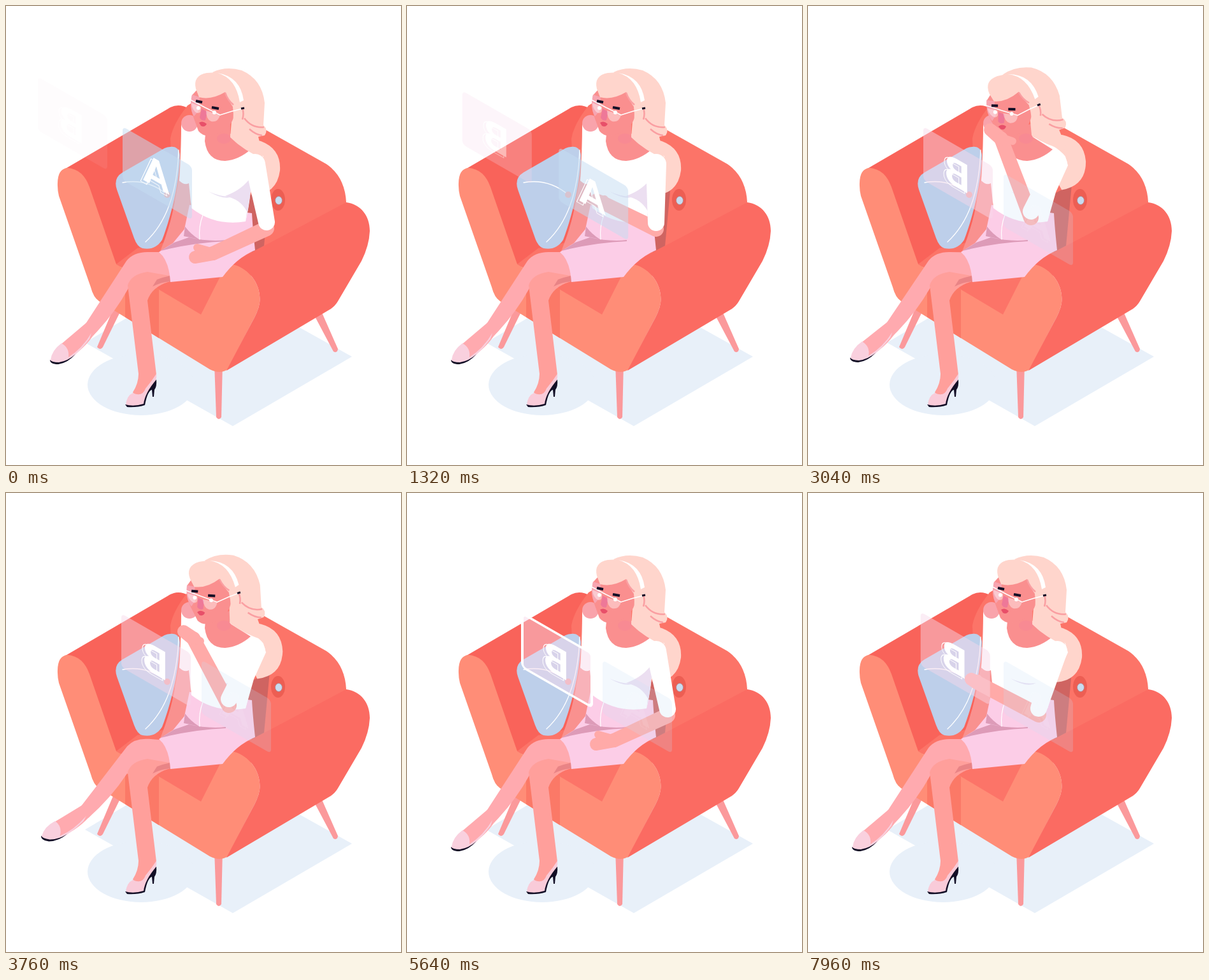
An HTML page for the animation above (8000 ms loop, 620 px wide and 720 px high).

```html
<!DOCTYPE html>
<html lang="en">
<head>
<meta charset="utf-8">
<title>Choosing a card</title>
<style>
  html, body { margin: 0; width: 100%; height: 100%; overflow: hidden; background: #fff; }
  svg { display: block; width: 620px; height: 720px; }
  text { font: 700 62px Roboto, "Open Sans", sans-serif; text-anchor: middle; }
  .hair { fill: #ffd5cc; }
  .face { fill: #fa8f8f; }
  .skin { fill: #ffaaa8; }
  .front { fill: #ff8d77; }
  .line { fill: none; stroke: #fff; stroke-linecap: round; }
</style>
</head>
<body>
<svg viewBox="0 0 620 720">
  <!-- floor -->
  <g fill="#e8f0f9">
    <path d="M124 528 290 430 462 505 543 550 356 659Z"/>
    <ellipse cx="212" cy="594" rx="84" ry="48"/>
  </g>

  <!-- sofa -->
  <g fill="#fb999b">
    <path d="M172 466 184 470 152 535Q148 541 143 535Z"/>
    <path d="M327 560H340L338 645Q334 651 330 645Z"/>
    <path d="M480 478 491 470 521 538Q520 545 514 542Z"/>
  </g>
  <path fill="#f9635a" d="M90 257 258 159Q272 152 287 161L300 390 175 410 120 300Z"/>
  <path fill="#fc7468" d="M258 208Q262 185 285 156L300 147 400 190 503 248Q532 268 534 308L470 400 320 440 262 300Z"/>
  <path fill="#fc7468" d="M173 405 206 380 400 340 360 470 306 486Z"/>
  <path class="front" d="M81 282Q80 255 97 254 121 256 131 284L173 405 306 484 342 413Q348 403 362 407C388 417 401 443 398 466Q396 479 385 498L348 570Q336 578 320 570L146 463Q137 457 133 441L83 298Q81 290 81 282Z"/>
  <path fill="#fb7967" d="M187 413 240 445V521L187 488Z"/>
  <path fill="#fb6b62" d="M345 408 534 308C557 311 571 329 571 353Q570 376 558 400L521 463Q517 470 510 475L346 572 385 498Q396 479 398 466C401 443 388 417 362 407Q352 403 345 408Z"/>
  <ellipse cx="427" cy="304" rx="11" ry="17" fill="#ed5e53"/>
  <ellipse cx="428" cy="305" rx="5.5" ry="6.5" fill="#c9dcf0" stroke="#b9868c"/>

  <!-- cushion -->
  <path fill="#bdcfea" d="M183 261 249 223Q271 215 273 234C272 275 260 328 245 367Q234 384 214 380 206 378 201 364L174 288Q168 270 183 261Z"/>
  <path class="line" stroke-width="1.3" d="M183 277Q222 270 253 296M271 226Q268 325 219 370"/>
  <circle cx="253" cy="296" r="5" fill="#eda7ab"/>

  <path fill="#cf6461" d="M376 300 414 280 405 376 386 386Z"/>
  <path id="lobe" class="hair" d="M350 200 400 212Q432 224 430 258 425 296 386 297Z"/>

  <!-- legs -->
  <g id="leg">
    <path fill="#ffaaaf" d="M262 386H222Q200 386 189 400L122 503 137 517Q170 483 192 443 215 445 262 428Z"/>
    <g id="foot">
      <path fill="#ffaaaf" d="M126 497 87 530 97 553Q122 540 141 511Z"/>
      <path fill="#f9d0de" d="M70 555Q72 540 87 529 100 536 98 551 120 537 134 513L131 522Q113 546 98 555 84 562 70 557Z"/>
      <path fill="#130f26" d="M69 555Q69 562 82 562 97 560 109 546 97 557 83 559 72 559 69 555Z"/>
    </g>
  </g>
  <path fill="#ff9f9b" d="M262 424 222 417Q196 421 191 438L208 577Q208 592 199 606L210 620 228 600 236 578 222 462Q230 438 262 431Z"/>
  <path fill="#e98486" d="M237 429Q247 425 258 423V432Q244 433 230 440Z"/>
  <path fill="#f9cbd9" d="M188 625Q190 611 199 607 214 614 219 600 229 588 236 577 238 590 224 602 218 616 216 624 200 631 188 625Z"/>
  <path fill="#130f26" d="M187 625Q200 629 216 624 218 607 236 586 237 597 233 602L232 613H230L229 602Q222 604 218 626 206 630 190 629Z"/>

  <!-- body -->
  <path fill="#f9918f" d="M272 268 290 276Q293 310 282 350L270 382 242 385Q260 340 266 300Z"/>
  <path fill="#fccde7" d="M288 312 386 325Q387 345 391 383 362 395 340 425L258 433Q256 399 240 386L262 372 280 350Z"/>
  <path fill="#dd9bb8" d="M243 384 264 371 287 363Q318 370 345 367V369Q295 371 243 384ZM281 346 279 361 303 366Q290 358 281 346Z"/>
  <path class="line" stroke-width="1.2" d="M309 328Q302 346 304 366"/>
  <path fill="#fff" d="M275 186Q290 175 314 196L352 205Q390 218 404 236L386 268Q383 310 376 338 328 346 291 317L287 278Q280 282 272 274 275 225 275 186Z"/>
  <path id="side" fill="#fff" d="M404 236 408 250 389 292 376 338 380 265Z"/>
  <path fill="#e9e0f2" d="M318 291Q340 301 358 298 344 306 318 291Z"/>
  <path id="fold" fill="#ecdff1" d="M386 266Q372 288 344 298 368 303 378 322L376 338Q384 300 386 266Z"/>
  <path class="face" d="M314 190 312 212Q316 243 344 243 366 241 384 225L352 205V185Z"/>
  <ellipse cx="342" cy="208" rx="11" ry="8" fill="#f88a93"/>
  <circle cx="288" cy="184" r="13" fill="#f9a3ab"/>

  <!-- head -->
  <g id="head">
    <path class="hair" d="M324 104Q345 94 370 101 402 115 406 152L404 187Q412 194 406 203L396 205 404 240Q372 226 352 206L358 130Z"/>
    <path class="face" d="M292 140Q288 158 294 174L302 196Q309 205 322 203 348 199 357 176L362 130 310 120Z"/>
    <path fill="#f7a5b1" d="M292 139Q287 160 295 173L302 165 304 143Z"/>
    <path class="hair" d="M298 130Q293 109 315 105 347 101 360 126L374 158 364 206 352 206Q359 180 356 158 348 147 344 135 322 148 303 143Z"/>
    <path fill="none" stroke="#fa9fa2" stroke-width="2.5" d="M344 136Q348 148 357 155M371 178Q374 169 371 160M374 176Q386 192 405 190M382 193Q392 202 402 203"/>
    <path fill="#fff" d="M332 105Q361 113 367 151L373 148Q368 111 332 105Z"/>
    <path fill="#ee7898" d="M307 161 316 166 313 179Q307 181 304 175Z"/>
    <path fill="#e84f69" d="M303 183Q309 179 315 185 312 191 306 188Z"/>
    <g fill="#fff" fill-opacity=".4">
      <path d="M291 152 306 158Q307 169 300 168 292 164 291 152Z"/>
      <path d="M314 164 336 171Q333 183 322 181 314 178 314 164Z"/>
    </g>
    <path class="line" stroke-width="1.5" d="M289 147 295 150 312 159 336 171 355 165 371 161"/>
    <circle cx="302" cy="160" r="3" fill="#fff"/>
    <circle cx="327" cy="167" r="3" fill="#fff"/>
    <path stroke="#130f26" stroke-width="4" d="M298 149 308 151M323 159 334 161"/>
    <path stroke="#130f26" stroke-width="3" d="M369 161 374 160"/>
  </g>

  <!-- moving arm -->
  <path id="forearm" class="skin"/>
  <path id="hand" class="skin"/>
  <path id="thumb" class="skin"/>
  <path id="sleeve" fill="#fff"/>

  <!-- cards -->
  <g id="cardA">
    <rect class="pane" width="109" height="84" rx="6" fill="#c5dcf2" fill-opacity=".52"/>
    <g class="letter">
      <text x="53" y="65" fill="#fff">A</text>
      <text x="49" y="69" class="line">A</text>
    </g>
  </g>
  <g id="cardB">
    <rect class="pane" width="109" height="84" rx="6" fill="#f6d7ea" fill-opacity=".46"/>
    <rect id="flash" width="109" height="84" rx="6" fill="#fff" fill-opacity=".3"/>
    <g class="letter" transform="matrix(-1 0 0 1 106 0)">
      <text x="53" y="65" fill="#fff">B</text>
      <text x="57" y="68" class="line">B</text>
    </g>
    <rect id="border" class="line" width="109" height="84" rx="6" stroke-width="4"/>
  </g>
</svg>

<script>
const LOOP = 8000;
const $ = id => document.getElementById(id);
const clamp = u => Math.min(1, Math.max(0, u));
const smooth = u => u * u * (3 - 2 * u);
const cubic = u => u < .5 ? 4 * u ** 3 : 1 - 4 * (1 - u) ** 3;
const span = (t, from, to) => cubic(clamp((t - from) / (to - from)));

// Arm poses: elbow, palm, fingertip offset, thumb offset
const REST = [409, 339, 325, 388, -28, 6, -25, -9];
const TOUCH = [362, 338, 265, 297, -9, -5, 2, -6];
const DRAG = [391, 340, 308, 309, -11, -5, 2, -6];
const LIFT = [376, 338, 298, 280, -6, -6, 4, -5];
const CHIN = [350, 322, 303, 208, -17, -14, 18, 4];
const TAP = [350, 326, 268, 290, -10, -3, -11, 3];

const tracks = {
  arm: [[120, REST], [480, TOUCH], [840, TOUCH], [1320, DRAG], [1960, LIFT], [2560, CHIN], [3500, CHIN],
        [4300, TAP], [4700, TAP], [5600, REST], [7080, REST], [7640, TOUCH], [7960, TOUCH]],
  head: [[1800, [0]], [2560, [-10]], [3500, [-10]], [4180, [0]]],
  foot: [[1960, [0]], [2510, [7.3]], [3060, [.9]], [3650, [4.7]], [4360, [2]], [5200, [0]]],
  fold: [[1960, [1]], [2400, [0]], [4900, [0]], [5400, [1]], [7100, [1]], [7500, [0]]],
  paneA: [[1320, [1]], [2560, [.4]]],
  letterA: [[1320, [1]], [2500, [.1]]],
  cardB: [[840, [.18]], [1860, [1]]],
  flash: [[4100, [0]], [4340, [1]], [4800, [0]]],
  border: [[4700, [0]], [5200, [1]], [7080, [1]], [7500, [0]]],
};

function at(name, t) {
  const keys = tracks[name];
  const i = keys.findIndex(k => k[0] > t);
  if (i === 0) return keys[0][1];
  if (i < 0) return keys[keys.length - 1][1];
  const [t0, a] = keys[i - 1], [t1, b] = keys[i];
  const u = smooth((t - t0) / (t1 - t0));
  return a.map((v, j) => v + (b[j] - v) * u);
}

// Tapered capsule between two circles
function limb(id, x1, y1, r1, x2, y2, r2) {
  const len = Math.hypot(x2 - x1, y2 - y1) || 1;
  const nx = (y2 - y1) / len, ny = (x1 - x2) / len;
  const p = (x, y, r) => `${x + nx * r} ${y + ny * r}`;
  $(id).setAttribute("d", `M${p(x1, y1, r1)}L${p(x2, y2, r2)}A${r2} ${r2} 0 0 1 ${p(x2, y2, -r2)}` +
    `L${p(x1, y1, -r1)}A${r1} ${r1} 0 0 1 ${p(x1, y1, r1)}Z`);
}

const turn = (id, angle, x, y) => $(id).setAttribute("transform", `rotate(${angle} ${x} ${y})`);
const place = (id, x, y) => $(id).setAttribute("transform", `matrix(1 .575 0 1 ${x} ${y})`);
const fade = (el, v) => el.setAttribute("opacity", v);
const part = (card, name) => $(card).querySelector("." + name);

function draw(t) {
  const [ex, ey, hx, hy, fx, fy, tx, ty] = at("arm", t);
  limb("sleeve", 391, 248, 16, ex, ey, 13);
  limb("forearm", ex, ey + 10, 12, hx, hy, 11);
  limb("hand", hx, hy, 11, hx + fx, hy + fy, 10);
  limb("thumb", hx, hy, 8, hx + tx, hy + ty, 6);

  const [fold] = at("fold", t);
  fade($("fold"), fold);
  fade($("side"), 1 - fold);

  const [tilt] = at("head", t);
  turn("head", tilt, 335, 210);
  turn("lobe", tilt * .85, 335, 210);

  const [swing] = at("foot", t);
  turn("leg", swing, 225, 415);
  turn("foot", swing, 125, 508);

  const a = span(t, 840, 1840);
  const b = span(t, 900, 1920) - span(t, 7760, 8760);
  place("cardA", 183 + 124 * a, 189 + 73 * a);
  place("cardB", 50 + 131 * b, 111 + 78 * b);
  fade(part("cardA", "pane"), at("paneA", t)[0]);
  fade(part("cardA", "letter"), at("letterA", t)[0]);
  fade($("cardB"), at("cardB", t)[0]);
  fade($("flash"), at("flash", t)[0]);
  fade($("border"), at("border", t)[0]);
}

function tick() {
  draw(performance.now() % LOOP);
  requestAnimationFrame(tick);
}
tick();
</script>
</body>
</html>
```
